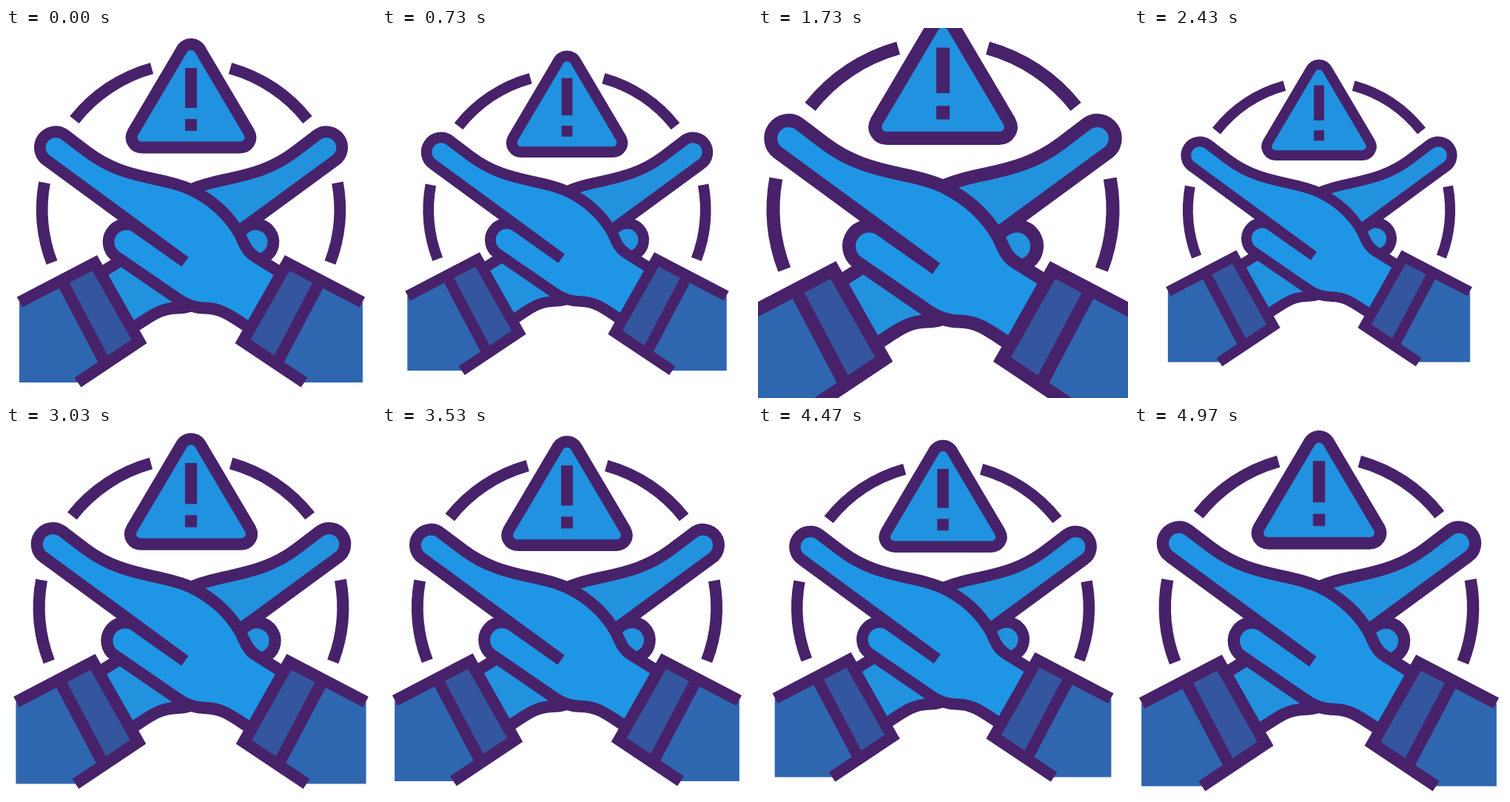
Recreate the animation shown at these times as an HTML page. Size 500x500 px, loop 5010 ms.

```html
<!DOCTYPE html>
<html lang="en">
<head>
<meta charset="utf-8">
<title>Warning hands</title>
<style>
  html, body { margin: 0; width: 100%; height: 100%; overflow: hidden; background: #fff; }
  svg { display: block; width: 100%; height: 100%; }
</style>
</head>
<body>
<svg viewBox="0 0 500 500">
  <defs>
    <path id="hand" d="M242 316 L55 179 A21 21 0 0 1 79 144 L110 167.500 C140 190 168 197 200 204
      C222 208.500 236 212 250 218.500 C284 235 303 256 316 279 C321 290 325 302 336 308.500 L372 331
      L333 408 C305 390 293 379 270 378.500 C255 378.500 243 374 232 366 L148 308.300
      A24 24 0 0 1 175 268.700 L242 316"/>
    <g id="side">
      <path fill="none" d="M92.500 124 A201.500 201.500 0 0 1 197 54.500 M52 209 A201.500 201.500 0 0 0 62 317"/>
      <path fill="#2f66b0" stroke="none" d="M18 371 L76 341 L133 452 L97 479 H18Z"/>
      <path fill="#34569f" stroke="none" d="M76 341 L120 317.500 L180 423.500 L133 452Z"/>
      <path fill="none" d="M18.500 370.500 L120 317.500 L180 423.500 L97 479 M75.500 342 L132.500 450"/>
    </g>
  </defs>
  <g id="art" stroke="#47226a" stroke-width="15.800">
    <use href="#hand" fill="#2292df" transform="matrix(-1 0 0 1 500 0)"/>
    <use href="#hand" fill="#1f96e5"/>
    <use href="#side"/>
    <use href="#side" transform="matrix(-1 0 0 1 500 0)"/>
    <path fill="#2092df" d="M236.500 31 L171.500 141 C166 151 173 161.500 184 161.500 H316 C327 161.500 334 151 328.500 141 L263.500 31 C258 19 242 19 236.500 31Z"/>
    <path d="M250 54 V108 M250 123 V139"/>
  </g>
</svg>
<script>
  const LOOP = 5010, STEP = 100 / 3, LAST = 149;
  const BEAT = 1500, FALL = 1000, RISE = 500, LOW = 0.85, RANGE = 0.3;
  const art = document.getElementById("art");

  // Decelerating shrink, then a steady swell; a beat begins halfway up the swell.
  function scaleAt(ms) {
    const p = (ms + BEAT - RISE / 2) % BEAT;
    const k = p < FALL ? (1 - p / FALL) ** 2 : (p - FALL) / RISE;
    return LOW + RANGE * k;
  }

  function draw(now) {
    const step = Math.min(LAST, Math.floor((now % LOOP + 5) / STEP));
    const s = scaleAt(step * STEP);
    art.setAttribute("transform", `translate(250 250) scale(${s}) translate(-250 -250)`);
  }

  const start = performance.now();
  function tick() {
    draw(performance.now() - start);
    requestAnimationFrame(tick);
  }
  tick();
</script>
</body>
</html>
```
